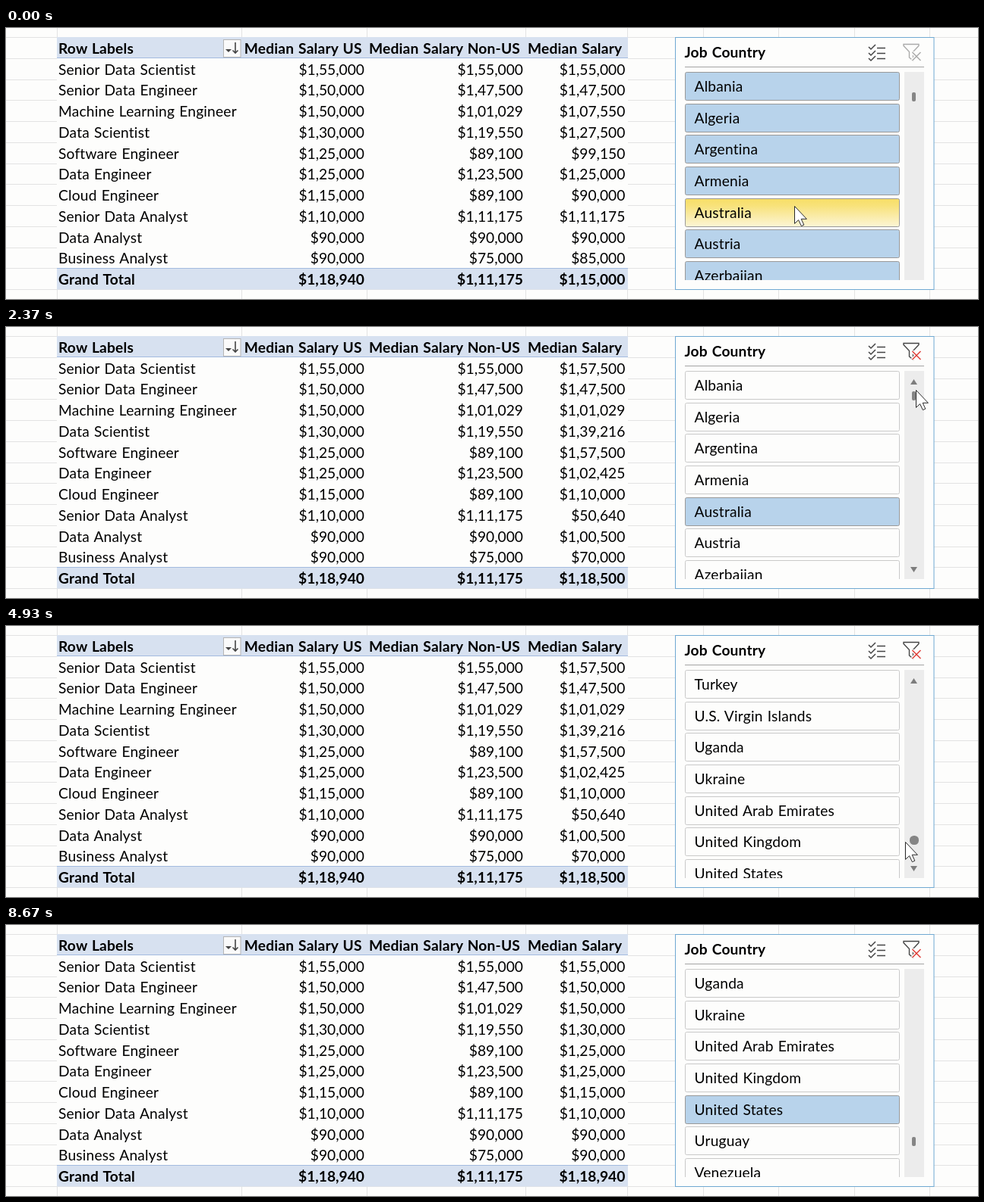
These frames come from a looping animation (1280 by 358 pixels, 8.7 s). An HTML page:

```html
<!DOCTYPE html>
<html lang="en">
<head>
<meta charset="utf-8">
<title>Median salary by job country</title>
<style>
  html, body { margin: 0; width: 100%; height: 100%; overflow: hidden; background: #fdfdfc; }
  svg { display: block; width: 1280px; height: 358px; }
  text { font: 19.2px Lato, "Open Sans", sans-serif; fill: #000; letter-spacing: .19px; word-spacing: 1px; white-space: pre; }
  .bold { font-weight: 700; letter-spacing: .18px; }
  .num { text-anchor: end; letter-spacing: 0; }
</style>
</head>
<body>
<svg id="stage" viewBox="0 0 1280 358">
  <defs>
    <linearGradient id="hover" x1="0" y1="0" x2="0" y2="1">
      <stop offset="0" stop-color="#f7de66"/>
      <stop offset=".25" stop-color="#f8e27a"/>
      <stop offset="1" stop-color="#fcf5d6"/>
    </linearGradient>
    <clipPath id="listClip"><rect x="890" y="57" width="320" height="276"/></clipPath>
  </defs>
  <g id="grid" stroke="#e3e3e3"></g>
  <g id="table"></g>
  <g id="slicer">
    <rect x="881.5" y="12.5" width="340.5" height="333" fill="#fdfdfc" stroke="#6fa9d2"/>
    <text class="bold" x="893.5" y="39">Job Country</text>
    <path d="M894 51.5H1209" stroke="#a3a3a3"/>
    <g fill="none" stroke="#444" stroke-width="1.5">
      <path d="M1136 25l3 3 6-6M1136 33l3 3 6-6M1136 40l3 3 6-6M1147 26.5H1158M1147 33.5H1158M1147 40.5H1158"/>
    </g>
    <path id="funnel" d="M1182 21.5H1202V23.5L1194.5 31.5V43L1189.5 39V31.5L1182 23.5Z" fill="#fdfdfc" stroke-width="1.4"/>
    <path d="M1193.5 32L1204.5 43M1204.5 32L1193.5 43" stroke="#fdfdfc" stroke-width="4.5"/>
    <path id="cross" d="M1193.5 32L1204.5 43M1204.5 32L1193.5 43" stroke-width="1.5"/>
    <g id="list" clip-path="url(#listClip)"></g>
    <rect x="1183" y="58" width="26" height="275" fill="#ececec"/>
    <path id="arrows" d="M1191 76L1195.5 69L1200 76ZM1191 317L1195.5 324L1200 317Z" fill="#7d7d7d"/>
    <rect id="thumb" fill="#858585"/>
  </g>
  <path id="cursor" d="M.5 .5V23.4L5.6 18.6L9.4 26.6L12.8 25.1L9.2 17.3H16.4Z" fill="#fff" stroke="#2a2a2a" stroke-linejoin="round"/>
</svg>
<script>
const LOOP = 8700;
const PICK_FIRST = 1260, PICK_SECOND = 6000;
const DRAG_START = 2900, DRAG_END = 4930, CURSOR_GONE = 8150;
const ROW = 27.76, ITEM = 41.67, SLOTS = 7;

const columns = [67.5, 310.5, 475.5, 684.5, 818.5, 918.5, 1017.5, 1117.5, 1216.5];
const heads = [["Row Labels", 69], ["Median Salary US", 313.8], ["Median Salary Non-US", 478], ["Median Salary", 687]];

// label, US, non-US, all countries, Australia
const rows = [
  ["Senior Data Scientist", 155000, 155000, 155000, 157500],
  ["Senior Data Engineer", 150000, 147500, 147500, 147500],
  ["Machine Learning Engineer", 150000, 101029, 107550, 101029],
  ["Data Scientist", 130000, 119550, 127500, 139216],
  ["Software Engineer", 125000, 89100, 99150, 157500],
  ["Data Engineer", 125000, 123500, 125000, 102425],
  ["Cloud Engineer", 115000, 89100, 90000, 110000],
  ["Senior Data Analyst", 110000, 111175, 111175, 50640],
  ["Data Analyst", 90000, 90000, 90000, 100500],
  ["Business Analyst", 90000, 75000, 85000, 70000],
  ["Grand Total", 118940, 111175, 115000, 118500]
];

const countries = ("Albania,Algeria,Argentina,Armenia,Australia,Austria,Azerbaijan,Bahamas,Bahrain,Bangladesh,Barbados,Belarus," +
  "Belgium,Benin,Bolivia,Bosnia and Herzegovina,Brazil,Brunei,Bulgaria,Cambodia,Cameroon,Canada,Cayman Islands,Chile,China," +
  "Colombia,Costa Rica,Côte d'Ivoire,Croatia,Cyprus,Czechia,Denmark,Dominican Republic,Ecuador,Egypt,El Salvador,Estonia," +
  "Ethiopia,Finland,France,Georgia,Germany,Ghana,Greece,Guam,Guatemala,Honduras,Hong Kong,Hungary,India,Indonesia,Iraq," +
  "Ireland,Israel,Italy,Jamaica,Japan,Jordan,Kazakhstan,Kenya,Kosovo,Kuwait,Kyrgyzstan,Latvia,Lebanon,Lithuania,Luxembourg," +
  "Macedonia,Malawi,Malaysia,Malta,Martinique,Mauritius,Mexico,Moldova,Montenegro,Morocco,Namibia,Nepal,Netherlands," +
  "New Zealand,Nicaragua,Nigeria,Norway,Oman,Pakistan,Panama,Paraguay,Peru,Philippines,Poland,Portugal,Puerto Rico,Qatar," +
  "Romania,Russia,Rwanda,Saudi Arabia,Senegal,Serbia,Singapore,Slovakia,Slovenia,South Africa,South Korea,Spain,Sri Lanka," +
  "Sudan,Sweden,Switzerland,Taiwan,Tanzania,Thailand,Tunisia,Turkey,U.S. Virgin Islands,Uganda,Ukraine,United Arab Emirates," +
  "United Kingdom,United States,Uruguay,Venezuela,Vietnam,Zambia,Zimbabwe").split(",");

// time, x, y of the pointer tip
const pointer = [
  [0, 1038, 235], [250, 1042, 232], [730, 1079, 179], [1100, 1076, 243], [1500, 1080, 244],
  [1900, 1228, 130], [2370, 1198, 83], [2750, 1200, 98], [3100, 1200, 100], [4000, 1202, 174],
  [4400, 1222, 235], [4750, 1190, 285], [4930, 1184, 285], [5600, 1080, 250],
  [6830, 1078, 252], [7400, 1078, 252], [8000, 1216, 215]
];
// time, scroll position in items
const scroll = [[DRAG_START + 150, 0], [4000, 43.9], [4750, 114], [5060, 114], [5200, 116]];

const $ = id => document.getElementById(id);

function add(parent, tag, attrs, text) {
  const node = document.createElementNS("http://www.w3.org/2000/svg", tag);
  set(node, attrs);
  if (text !== undefined) node.textContent = text;
  return parent.appendChild(node);
}

function set(node, attrs) {
  for (const key in attrs) node.setAttribute(key, attrs[key]);
}

function sample(keys, t, ease = k => k) {
  if (t <= keys[0][0]) return keys[0].slice(1);
  for (let i = 1; i < keys.length; i++) {
    const a = keys[i - 1], b = keys[i];
    if (t <= b[0]) {
      const k = ease((t - a[0]) / (b[0] - a[0]));
      return a.slice(1).map((v, j) => v + (b[j + 1] - v) * k);
    }
  }
  return keys[keys.length - 1].slice(1);
}

const smooth = k => k * k * (3 - 2 * k);
const money = n => "$" + n.toLocaleString("en-IN");

function buildSheet() {
  for (const x of columns) add($("grid"), "path", { d: `M${x} 0V358` });
  for (let i = 0; i <= 12; i++) {
    add($("grid"), "path", { d: `M0 ${Math.round(12 + i * ROW) + .5}H1280` });
  }
  const table = $("table");
  add(table, "rect", { x: 67, y: 12, width: 752, height: 333, fill: "#fdfdfc" });
  for (const y of [12, 317.5]) add(table, "rect", { x: 67, y, width: 752, height: 28, fill: "#d7e1f0" });
  add(table, "path", { d: "M67 39.5H819M67 317.5H819", stroke: "#a3bbdf" });
  for (const [label, x] of heads) add(table, "text", { class: "bold", x, y: 33.8 }, label);

  add(table, "rect", { x: 286.5, y: 15.5, width: 22.5, height: 23, fill: "#fafafa", stroke: "#b5b5b5" });
  add(table, "path", { d: "M289 28H297L293 32Z", fill: "#444" });
  add(table, "path", { d: "M302 19V33M298.5 29.5L302 33L305.5 29.5", fill: "none", stroke: "#444", "stroke-width": 1.6 });

  return rows.map(([label, us, other], i) => {
    const y = 33.8 + ROW * (i + 1);
    const weight = i === rows.length - 1 ? "bold" : "";
    add(table, "text", { class: weight, x: 69, y }, label);
    const number = (x, n) => add(table, "text", { class: weight + " num", x, y }, money(n));
    number(472, us);
    number(681, other);
    return number(815.3, 0);
  });
}

function buildList() {
  return Array.from({ length: SLOTS }, (_, i) => {
    const y = 58 + i * ITEM;
    return {
      y,
      box: add($("list"), "rect", { x: 894.5, y: Math.round(y) + .5, width: 282, height: 37, rx: 2 }),
      label: add($("list"), "text", { x: 906.5, y: y + 26 })
    };
  });
}

const totals = buildSheet();
const slots = buildList();

function draw(t) {
  const [x, y] = sample(pointer, t, smooth);
  const [pos] = sample(scroll, t);
  const visible = t < CURSOR_GONE;
  const picked = t < PICK_FIRST ? null : t < PICK_SECOND ? "Australia" : "United States";
  const dragging = t >= DRAG_START && t <= DRAG_END;
  const overList = visible && !dragging && x >= 894 && x <= 1177;
  const barHot = dragging || (visible && x >= 1183 && x <= 1209);

  const column = !picked ? 3 : picked === "Australia" ? 4 : 1;
  totals.forEach((node, i) => { node.textContent = money(rows[i][column]); });

  const first = Math.floor(pos + 1e-6);
  slots.forEach((slot, i) => {
    const name = countries[first + i];
    const on = !picked || picked === name;
    const hot = overList && y >= slot.y && y < slot.y + 38;
    slot.label.textContent = name;
    set(slot.box, {
      fill: hot ? "url(#hover)" : on ? "#b8d3eb" : "#fdfdfc",
      stroke: on || hot ? "#999" : "#c9c9c9"
    });
  });

  set($("funnel"), { stroke: picked ? "#444" : "#ababab" });
  set($("cross"), { stroke: picked ? "#e0403a" : "#ababab" });
  set($("arrows"), { visibility: barHot ? "visible" : "hidden" });

  const w = barHot && t > 2420 ? 12 : 5;
  set($("thumb"), { x: Math.floor(1196 - w / 2), y: Math.round(85 + pos * 1.685), width: w, height: 12, rx: w === 12 ? 5.5 : 2 });
  set($("cursor"), { transform: `translate(${x} ${y})`, visibility: visible ? "visible" : "hidden" });
}

const start = performance.now();
function tick() {
  draw((performance.now() - start) % LOOP);
  requestAnimationFrame(tick);
}
draw(0);
requestAnimationFrame(tick);
</script>
</body>
</html>
```
